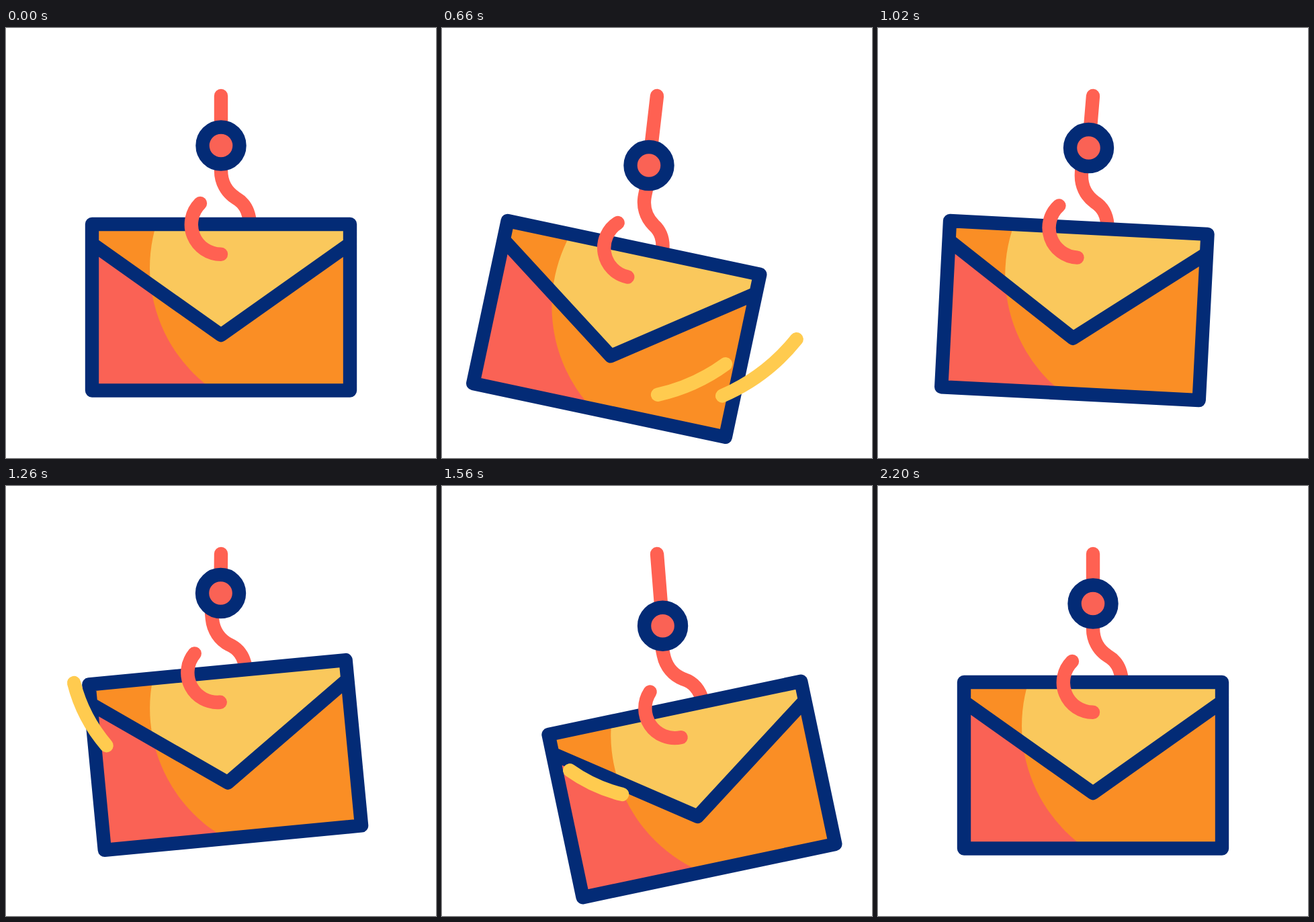
Animation, 640 px wide and 640 px high, one loop 2.4 s. Source, as an HTML page:

```html
<!DOCTYPE html>
<html lang="en">
<head>
<meta charset="utf-8">
<title>Phishing mail</title>
<style>
  html, body { margin: 0; width: 100%; height: 100%; overflow: hidden; background: #fff; }
  svg { display: block; width: 100vw; height: 100vh; }
  .line { fill: none; stroke-width: 20.4; stroke-linecap: round; stroke-linejoin: round; }
  .navy { stroke: #032b76; }
  .coral { stroke: #ff6152; }
  .swish { stroke: #ffcb4f; }
</style>
</head>
<body>
<svg viewBox="0 0 640 640">
  <defs>
    <clipPath id="body"><path d="M128 292H512V539.5H128Z"/></clipPath>
    <clipPath id="flap"><path d="M128 292H512V321L320 456.5L128 321Z"/></clipPath>
  </defs>

  <path id="cord" class="line coral"/>

  <g id="mail">
    <path class="line coral" d="M320 198V212C320 229 328 244 342 253C354 260 362 271 363 292"/>
    <g clip-path="url(#body)">
      <path fill="#fa6255" d="M128 292H512V539.5H128Z"/>
      <circle cx="436" cy="357" r="222" fill="#fa8e25"/>
    </g>
    <g clip-path="url(#flap)">
      <path fill="#fa8e25" d="M128 292H512V460H128Z"/>
      <circle cx="436" cy="357" r="222" fill="#fac85c"/>
    </g>
    <path class="line navy" d="M128 292H512V539.5H128ZM128 321L320 457L512 321"/>
    <path class="line coral" d="M289 261A44.2 44.2 0 0 0 320 336.7"/>
  </g>

  <circle id="ring" class="line navy" r="27.5" style="fill:#fa6255"/>
  <g id="swishes"></g>
</svg>

<script>
  const LOOP = 2400;
  const $ = id => document.getElementById(id);

  // Shared key times and the pose values at each of them
  const TIMES = [200, 800, 1200, 1600, 2200];
  const POSE = {
    mailX: [0, -69.8, 3.1, 53.3, 0],
    mailY: [0, 37.2, -18.8, 37.2, 0],
    tilt:  [0, 13.9, -5, -12.1, 0],
    ringX: [0, -13.9, -1.1, 8.8, 0],
    ringY: [0, 34.2, -18.8, 34.6, 0]
  };

  // Arcs swept from angle a to b, head first and tail later
  const SWISHES = [
    { x: 263, y: 282, r: 270, a: 44.4, b: 77.8, start: 280 },
    { x: 303, y: 283, r: 288, a: 27.5, b: 66.9, start: 280 },
    { x: 322.6, y: 237, r: 228.5, a: 165.8, b: 103.8, start: 1080 }
  ];
  const SWEEP = 400, LAG = 240;

  for (const s of SWISHES) {
    s.el = document.createElementNS("http://www.w3.org/2000/svg", "path");
    s.el.setAttribute("class", "line swish");
    $("swishes").append(s.el);
  }

  const ease = (t, from, to) => {
    const p = Math.min(1, Math.max(0, (t - from) / (to - from)));
    return p * p * (3 - 2 * p);
  };

  function sample(values, t) {
    let v = values[0];
    for (let i = 1; i < values.length; i++)
      v += (values[i] - values[i - 1]) * ease(t, TIMES[i - 1], TIMES[i]);
    return v;
  }

  function drawSwish(s, t) {
    const head = ease(t, s.start, s.start + SWEEP);
    const tail = ease(t, s.start + LAG, s.start + LAG + SWEEP);
    const shown = head - tail > 0.002;
    s.el.style.display = shown ? "" : "none";
    if (!shown) return;
    const point = p => {
      const angle = (s.a + (s.b - s.a) * p) * Math.PI / 180;
      return `${s.x + s.r * Math.cos(angle)} ${s.y + s.r * Math.sin(angle)}`;
    };
    const dir = s.b > s.a ? 1 : 0;
    s.el.setAttribute("d", `M${point(tail)}A${s.r} ${s.r} 0 0 ${dir} ${point(head)}`);
  }

  function draw(t) {
    const pose = {};
    for (const key in POSE) pose[key] = sample(POSE[key], t);
    const x = 320 + pose.ringX, y = 175 + pose.ringY;
    $("cord").setAttribute("d", `M320 101L${x} ${y}`);
    $("ring").setAttribute("cx", x);
    $("ring").setAttribute("cy", y);
    $("mail").setAttribute("transform",
      `translate(${pose.mailX} ${pose.mailY}) rotate(${pose.tilt} 320 416)`);
    for (const s of SWISHES) drawSwish(s, t);
  }

  const began = performance.now();
  function tick() {
    draw((performance.now() - began) % LOOP);
    requestAnimationFrame(tick);
  }
  tick();
</script>
</body>
</html>
```
